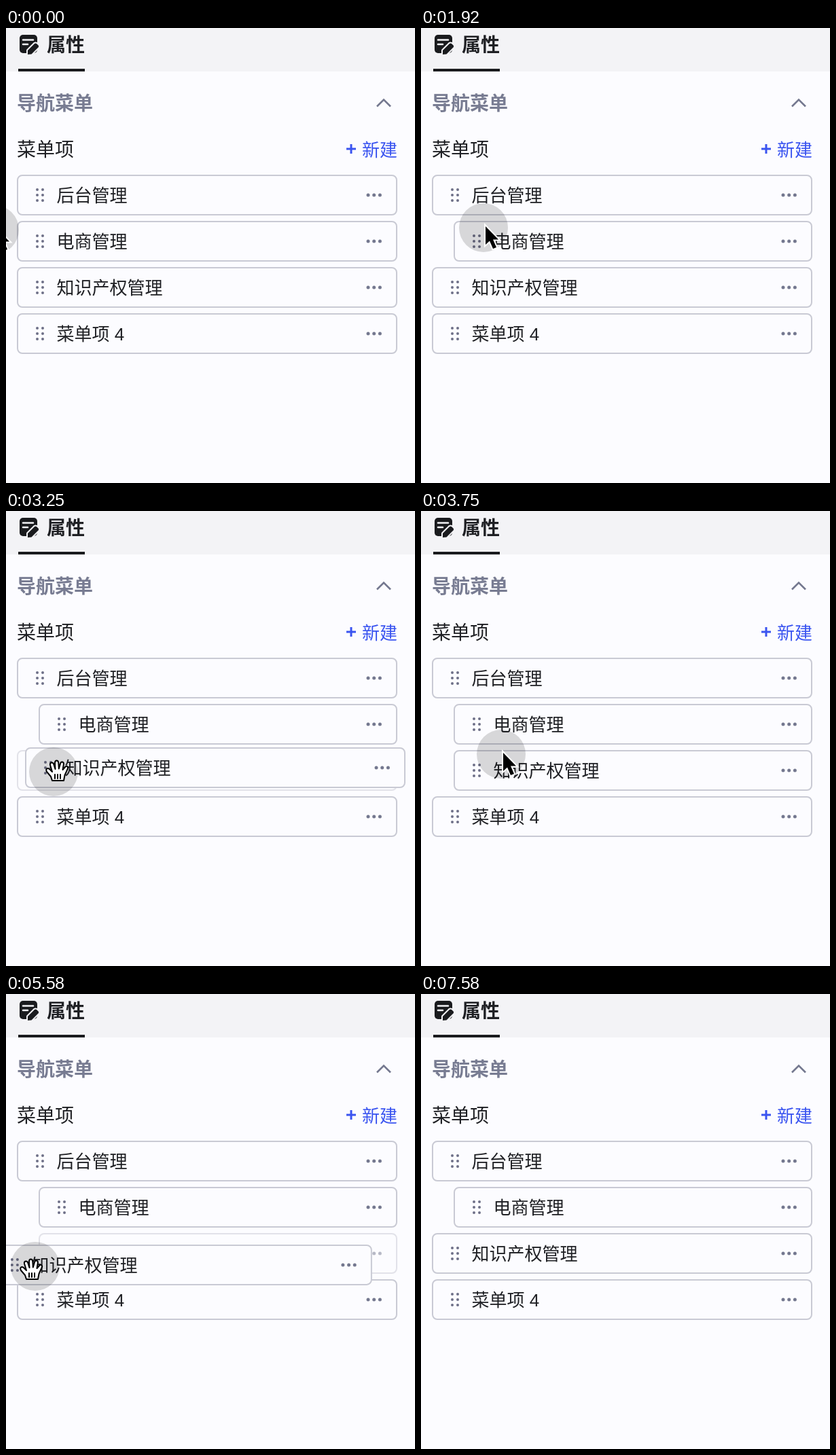
An HTML page for the animation above (8080 ms loop, 602x670 px).

```html
<!DOCTYPE html>
<html lang="zh-CN">
<head>
<meta charset="utf-8">
<title>导航菜单</title>
<style>
  html, body { margin: 0; width: 100%; height: 100%; overflow: hidden; background: #fcfcff; }
  svg { display: block; width: 602px; height: 670px; }
  text { font-family: "Liberation Sans", "Noto Sans CJK SC", "Noto Sans CJK", sans-serif; font-size: 26px; fill: #1f2024; }
  .big { font-size: 28px; }
  .bold { font-weight: 700; }
  .box { fill: #fcfcff; stroke: #c9cad4; stroke-width: 2; }
  .grip { fill: #6e7088; }
  .more { fill: #74788f; }
</style>
</head>
<body>
<svg viewBox="0 0 602 670">
  <rect width="602" height="670" fill="#fcfcff"/>
  <rect width="602" height="64" fill="#f3f3f6"/>
  <rect x="18" y="60" width="98" height="4" fill="#1a1b1e"/>

  <rect x="20" y="10" width="26" height="27" rx="5" fill="#1a1b1e"/>
  <path d="M25 17.500H40M25 24H32" stroke="#f3f3f6" stroke-width="2.600" stroke-linecap="round"/>
  <path d="M32 39V33L42 23Q43.500 22 45 23L47.500 25.500Q49 27 47.500 28.500L37.500 38.500Z"
        fill="#1a1b1e" stroke="#f3f3f6" stroke-width="4" paint-order="stroke" stroke-linejoin="round"/>
  <text class="big bold" x="60" y="35">属性</text>

  <text class="big bold" x="16" y="121" style="fill:#787c92">导航菜单</text>
  <path d="M546 115.500L556 105.500L566 115.500" fill="none" stroke="#74788f" stroke-width="2.600"/>
  <text class="big" x="16" y="189">菜单项</text>
  <path d="M501 178H515M508 171V185" stroke="#3a54f0" stroke-width="3"/>
  <text x="524" y="188.500" style="fill:#3a54f0">新建</text>

  <g id="list"></g>
  <circle id="halo" r="36" fill="#000" fill-opacity=".15"/>
  <path id="arrow" d="M0 0V27L6 21.500L11 33L16 31L11 19.500H19Z"
        fill="#000" stroke="#fff" stroke-width="4" paint-order="stroke"/>
  <g id="hand" stroke="#000" stroke-width="2" stroke-linejoin="round" stroke-linecap="round">
    <path fill="#fff" d="M-7 14L-9 8L-15 1q-2-4 1-5q2-.5 4 2l3 3L-10-9q-.5-3 2-3.500q2.500-.3 3.300 2.500L-2.500-3L-3-12
      q0-3.500 2.500-3.500q2.500 0 2.800 3.500L2.800-3.500L5-11q.8-3 3-2.500q2.400.6 1.800 4L8.500-2L12-6q1.800-2 3.400-.6q1.500 1.500 0 4
      L11.500 6L10 14Z"/>
    <path d="M-3 5V11M1 5V11M5 5V11"/>
  </g>
</svg>
<script>
const LOOP = 8080, FPS = 12;
const labels = ['后台管理', '电商管理', '知识产权管理', '菜单项 4'];
const LEFT = 16, NESTED = 48, RIGHT = 576;

// Pointer stops: [tick, x, y]
const stops = [
  [4, -17, 297], [10, 54, 314], [13, 58, 318], [16, 58, 318], [19, 92, 294],
  [27, 92, 294], [34, 58, 388], [37, 58, 388], [38, 70, 384], [39, 74, 381],
  [43, 118, 358], [52, 118, 358], [57, 80, 384], [63, 80, 384], [67, 36, 404],
  [69, 36, 404], [71, 36, 406]
];
const EXIT = 80;
// Drags: [row, press tick, release tick]
const drags = [[1, 14, 22], [2, 36, 45], [2, 61, 70]];
// Ticks with the open hand
const hands = [[13, 23], [33, 45], [57, 72]];

const $ = id => document.getElementById(id);
const within = (n, a, b) => n >= a && n < b;
const rowY = i => 216 + 68 * i;

function pointer(n) {
  if (n > EXIT) {
    const u = (n - EXIT) / 9;
    return [36 + 452 * u ** 1.27, 406 + 298 * u ** 1.15];
  }
  const i = stops.findIndex(s => s[0] > n);
  if (i === 0) return stops[0].slice(1);
  if (i < 0) return stops[stops.length - 1].slice(1);
  const [t0, x0, y0] = stops[i - 1], [t1, x1, y1] = stops[i];
  const u = (n - t0) / (t1 - t0), k = u * u * (3 - 2 * u);
  return [x0 + (x1 - x0) * k, y0 + (y1 - y0) * k];
}

function rowLeft(i, n) {
  const nested = i === 1 ? n >= 22 : i === 2 && within(n, 45, 70);
  return nested ? NESTED : LEFT;
}

const dot = (x, y, r, cls) => `<circle class="${cls}" cx="${x}" cy="${y}" r="${r}"/>`;

function row(label, x, y, width, opacity = 1) {
  let s = `<g transform="translate(${x} ${y})" opacity="${opacity}">` +
    `<rect class="box" x="1" y="1" width="${width - 2}" height="58" rx="7"/>`;
  for (const gx of [30, 38]) for (const gy of [22, 30, 38]) s += dot(gx, gy, 2, 'grip');
  for (const d of [43, 34.3, 25.6]) s += dot(width - d, 30, 2.5, 'more');
  return s + `<text x="58.500" y="40">${label}</text></g>`;
}

function move(id, [x, y], dx = 0, dy = 0) {
  $(id).setAttribute('transform', `translate(${x + dx} ${y + dy})`);
}

function draw(n) {
  const tip = pointer(n), halo = pointer(n - 1);
  const drag = drags.find(d => within(n, d[1], d[2]));
  let html = labels.map((label, i) => {
    const x = rowLeft(i, n);
    return row(label, x, rowY(i), RIGHT - x, drag && drag[0] === i ? 0.5 : 1);
  }).join('');
  if (drag) {
    const [i, press] = drag, grab = pointer(press - 1);
    html += row(labels[i], LEFT + halo[0] - grab[0], rowY(i) + halo[1] - grab[1], RIGHT - LEFT);
  }
  $('list').innerHTML = html;

  const open = hands.some(h => within(n, h[0], h[1]));
  $('hand').style.display = open ? '' : 'none';
  $('arrow').style.display = open ? 'none' : '';
  move('halo', halo);
  move('arrow', tip, 3, -2);
  move('hand', tip, 1, 2);
}

let last = -1;
const start = performance.now();
function frame() {
  const t = (performance.now() - start) % LOOP;
  const n = Math.floor((t + 5) * FPS / 1000);
  if (n !== last) draw(last = n);
  requestAnimationFrame(frame);
}
frame();
</script>
</body>
</html>
```
